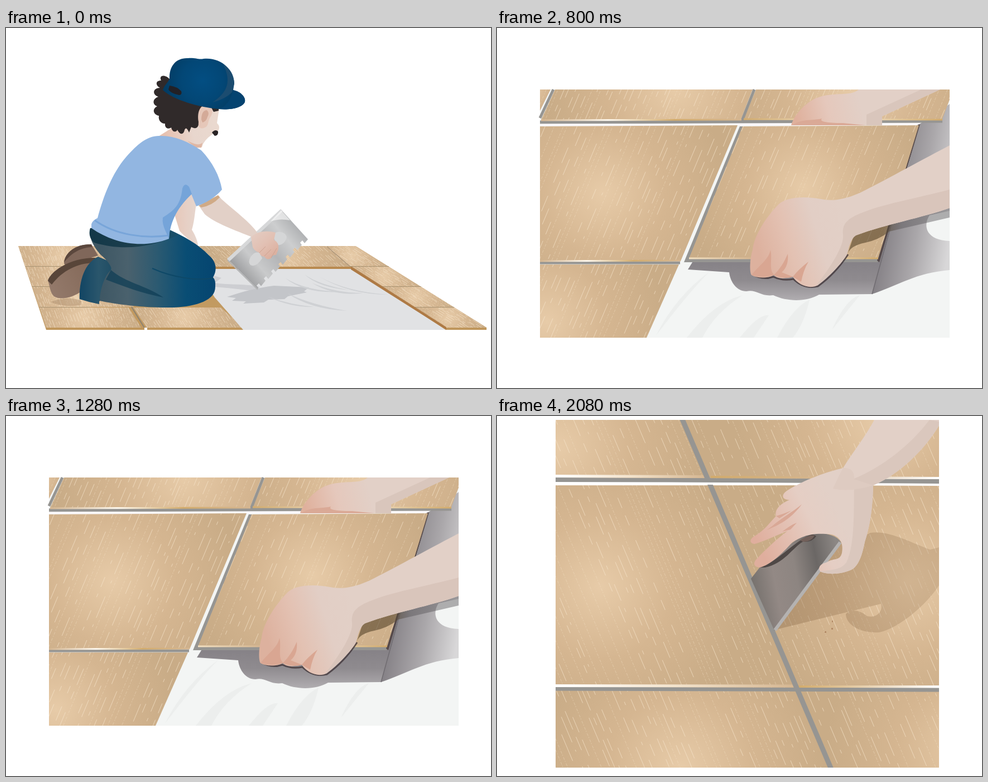
Animation of 869 by 644 pixels, one loop 2400 ms. Source, as an HTML page with a canvas:

```html
<!DOCTYPE html>
<html lang="en">
<head>
<meta charset="utf-8">
<title>Laying floor tiles</title>
<style>
html, body { margin: 0; width: 100%; height: 100%; overflow: hidden; background: #fff; }
canvas { display: block; }
</style>
</head>
<body>
<canvas id="stage" width="869" height="644"></canvas>
<script>
const ctx = document.getElementById('stage').getContext('2d');
const SKIN = '#e2d0c7', GROUT = '#969592', LIGHT = '#e7cba8', TAN = '#d5b691', DARK = '#c9ac87', GOLD = '#d2ab6c';

function fill(d, paint) {
  ctx.fillStyle = paint;
  ctx.fill(new Path2D(d));
}
function line(d, paint, width = 1) {
  ctx.strokeStyle = paint;
  ctx.lineWidth = width;
  ctx.stroke(new Path2D(d));
}
function stops(gradient, colors) {
  colors.forEach((c, i) => gradient.addColorStop(i / (colors.length - 1), c));
  return gradient;
}
const linear = (x0, y0, x1, y1, ...colors) => stops(ctx.createLinearGradient(x0, y0, x1, y1), colors);
const radial = (x, y, r, ...colors) => stops(ctx.createRadialGradient(x, y, 0, x, y, r), colors);

function clipped(d, draw) {
  ctx.save();
  ctx.clip(new Path2D(d));
  draw();
  ctx.restore();
}

function randomFrom(seed) {
  return () => (seed = (seed * 16807) % 2147483647) / 2147483647;
}

// A tile lit from (cx, cy), with pale broken streaks running along `slant` (dx per dy).
function tile(d, [x0, y0, x1, y1], cx, cy, r, slant, gap, dash) {
  fill(d, radial(cx, cy, r, LIGHT, TAN, DARK));
  clipped(d, () => {
    const rnd = randomFrom(x0 * 31 + y0 * 7 + 11), lean = slant * (y1 - y0);
    for (let x = x0 - Math.max(lean, 0); x < x1 - Math.min(lean, 0); x += gap * (0.5 + rnd())) {
      const fine = rnd() < 0.35;
      ctx.setLineDash(fine ? [2, 3, 5, 2] : [dash * (0.5 + rnd()), dash * 0.4, dash * rnd() + 3, dash * 0.8]);
      ctx.lineDashOffset = rnd() * 80;
      line(`M${x},${y0}L${x + lean},${y1}`, fine ? 'rgba(246,228,200,.4)' : 'rgba(247,230,206,.65)', 1);
    }
    ctx.setLineDash([]);
  });
}

function ledge(x0, y0, x1, y1, width, ...colors) {
  line(`M${x0},${y0}L${x1},${y1}`, linear(x0, 0, x1, 0, ...colors), width);
}

function floor() {
  const rows = [[390, 426], [427, 462], [463, 499], [500, 536]];
  fill('M22,390L628,391L861,536V540H72Z', '#c29a61');
  rows.forEach(([a, b], i) => {
    const l = y => 22 + (y - 390) * 0.342, r = y => 628 + (y - 391) * 1.607;
    tile(`M${l(a)},${a}H${l(a) + 160}L${l(b) + 170},${b}H${l(b)}Z`, [22, a, 260, b], l(a) + 80, a + 18, 105, 0.38, 4, 14);
    const inner = y => 617 + (y - 427) * 1.57;
    tile(`M${inner(a)},${a}H${r(a)}L${r(b)},${b}H${inner(b)}Z`, [540, a, 861, b], inner(a) + 60, a + 18, 70, 1.6, 5, 14);
    if (i) line(`M${l(a)},${a - 0.5}H150M${inner(a)},${a - 0.5}H${r(a)}`, '#a99372', 1);
  });
  tile('M180,390H574L617,427H200Z', [180, 390, 617, 427], 490, 408, 120, 1.1, 5, 14);
  tile('M228,500H385L425,536H252Z', [228, 500, 425, 536], 320, 516, 100, 0.65, 4, 14);
  line('M575,391L617,427', '#ad967a', 1.5);
  line('M225,499L249,538', '#8e8371', 2);
  fill('M248,536H253V541H248Z', '#fff');
  fill('M72,536H248V540H72ZM253,536H425V540H253ZM789,536H861V540H789Z', '#bf965c');
  fill('M340,430H620L788,540H425L374,482Z', '#e1e2e4');
  line('M340,429H621', '#b98a50', 4);
  fill('M618,427L624,430L789,535V540L618,432Z', '#ae7a45');
}

function brushMarks() {
  fill('M372,443L386,447L374,456C400,460 430,457 455,463L445,471C420,467 395,465 374,463Z', '#cdced2');
  fill('M396,481C425,471 450,465 480,461L543,464L534,471L539,473L505,480L499,485L470,486L462,491L425,493L430,489L405,488L412,483Z', '#c3c5c9');
  const marks = ['M535,441Q560,459 615,469Q560,464 535,441', 'M560,444Q610,472 685,477Q615,477 560,444',
    'M500,447Q535,470 602,472Q535,476 500,447', 'M505,475Q550,496 611,506Q545,503 505,475', 'M470,481Q510,495 552,499Q510,500 470,481', 'M548,456Q590,474 640,474Q590,481 548,456'];
  marks.forEach(d => fill(d, '#cfd1d4'));
}

function legs() {
  fill('M80,490Q110,478 135,488L134,496Q100,500 80,490', 'rgba(120,90,60,.25)');
  fill('M104,420C106,401 126,386 153,387L165,407L112,424Q104,425 104,420Z', '#80675a');
  fill('M104,419C106,401 126,386 153,387L154,392C130,393 116,405 104,419Z', '#5b473d');
  fill('M75,452C95,426 128,411 160,411L172,430L134,472C118,483 97,487 86,480C78,472 79,462 75,452Z', linear(80, 470, 160, 430, '#947a6b', '#836858'));
  fill('M75,452C79,437 112,411 160,411L157,420C128,421 102,433 82,459Z', '#584539');
  fill('M132,489C130,450 142,420 165,409L215,430L195,470L167,489V494Q150,491 132,485Z', linear(132, 0, 200, 0, '#124563', '#2a566c', '#1c4a61'));
  fill('M151,358C147,374 158,393 170,406C182,416 191,428 188,433C177,442 168,468 168,488C202,495 250,501 300,500C343,498 375,487 375,463Q376,451 371,446C380,431 375,417 365,408C344,386 318,372 293,361Z',
    linear(165, 0, 376, 0, '#3d5663', '#4a616d', '#2c5a71', '#094d74', '#054570'));
  fill('M151,358C147,370 152,379 158,384C205,398 255,395 310,370L293,361Z', linear(150, 0, 310, 0, '#123748', '#1d3f4d', '#18506c'));
  fill('M188,433C215,456 250,460 282,482C245,475 210,462 179,450Z', 'rgba(14,60,84,.7)');
  line('M371,447C345,453 300,447 262,430', '#0e4867', 2);
}

function head() {
  fill('M273,194L300,177L330,180L345,140L382,144L378,170Q385,177 380,184L370,190Q354,201 351,213H335C317,205 300,194 273,194Z', linear(285, 190, 380, 165, '#e7c1b0', '#e8d6cd', '#ead9cf'));
  fill('M352,205C345,212 335,206 325,202L340,214H350Z', '#dfb7a4');
  fill('M369,187Q375,180 380,185Q381,192 374,193Z', '#282325');
  fill('M294,92C285,82 273,84 278,94C266,94 269,104 276,107C261,108 263,120 273,123C261,127 263,138 271,140C261,145 264,155 274,157C272,166 280,172 285,171C284,181 293,181 296,178C298,187 305,187 307,182C311,191 318,192 320,182Q323,175 328,187L332,177C340,182 346,178 345,168L347,149L368,143L372,150L381,148V138L310,106Z', '#302a2a');
  fill('M345,168C342,150 348,138 359,137C369,138 373,148 367,158C360,167 365,176 354,179C347,181 344,176 345,168Z', '#e6c7b9');
  fill('M350,164C350,154 353,147 360,147Q365,152 361,159Q359,167 352,169Z', '#d4aa98');
  fill('M293,91C292,68 305,53 326,54C340,53 345,57 354,55C386,52 408,75 409,99L407,111C421,114 430,124 428,132C424,143 401,147 382,145C347,142 300,129 281,111C283,103 290,98 293,91Z', radial(352, 94, 75, '#034e82', '#034776', '#03395e'));
  fill('M389,65Q408,76 409,99L405,115Q393,127 370,133C398,115 404,94 389,65Z', '#1b4c70');
  fill('M407,111C421,114 430,124 428,132C424,143 401,147 382,145C398,138 403,125 407,111Z', '#044370');
  fill('M293,103Q307,105 314,113Q316,120 310,120Q295,117 291,110Z', '#222126');
}

function trowel() {
  let edge = 'M397,413L493,325L541,378';
  for (let i = 0; i < 7; i++) {
    const x = 541 - i * 13, y = 378 + i * 12.8;
    edge += `L${x - 6},${y + 7}l-4,-5l-4,4l3,4`;
  }
  fill(edge + 'L451,467Z', linear(420, 440, 525, 350, '#9c9d9f', '#c9cacb', '#b4b5b7', '#cdcecf', '#aaacae'));
  fill('M396,413L492,324L496,328L400,418Z', '#d7d8d9');
  line('M397,415L451,468', '#b4b5b6', 2);
  fill('M493,326L509,344Q490,340 474,346Z', 'rgba(255,255,255,.6)');
  fill('M477,370C486,361 501,364 503,374C501,384 494,389 486,388ZM438,410Q446,398 455,403L459,412Q448,429 438,424Q433,419 438,410Z', '#d5d6d7');
}

function worker() {
  floor();
  brushMarks();
  fill('M333,297C316,310 307,325 302,334L311,363C322,375 338,386 345,393C343,378 337,367 333,361C339,341 338,325 342,313Z', linear(302, 0, 342, 0, '#e7c8ba', '#e6d6ce'));
  legs();
  head();
  trowel();
  fill('M347,320L381,300L386,306C413,330 436,346 451,367L441,374C411,362 374,349 356,333Z', SKIN);
  fill('M345,318L380,299L383,303Q369,318 350,321Z', '#d0aa86');
  fill('M439,374C451,363 468,362 483,366L480,379Q490,384 488,396L484,406Q476,405 475,412Q467,416 463,409Q456,409 454,402Q445,399 442,392Z', linear(440, 365, 478, 411, '#e4cdc3', '#e2c1b4', '#dcaf9e'));
  line('M463,408L475,396M454,402L465,391M475,411L485,394', '#cda392', 1);
  fill('M153,351Q155,344 164,340C175,300 190,260 215,231C236,207 254,192 276,193C301,192 326,203 350,219C370,240 383,265 387,289Q370,309 341,319L332,297C311,319 295,340 293,362L292,377C245,395 193,386 153,358Z', '#92b6e1');
  fill('M281,339C302,326 313,316 316,287Q320,275 328,284L333,297C310,318 294,344 292,377L287,366Q279,350 281,339Z', '#75a4d9');
  line('M159,344C197,371 248,377 292,371', '#78a5d9', 3);
}

function laying() {
  const mid = [77, 174, 435, 420];
  fill('M77,110H811V554H77Z', '#f3f5f4');
  ['M285,550Q320,480 382,435Q350,465 285,550', 'M340,554Q390,490 440,478Q390,510 368,554', 'M435,554Q470,510 487,514L460,554', 'M502,554Q530,500 560,486Q550,530 530,554', 'M600,540Q625,485 650,478L600,540']
    .forEach(d => fill(d, '#eceeed'));
  // Shadows on the bare floor
  fill('M811,136L757,172L672,476C720,460 750,438 811,433Z', linear(705, 280, 825, 300, '#858186', '#aaa7aa', '#d8d7d8'));
  fill('M811,327L775,335C762,355 770,380 811,381Z', '#f3f5f4');
  fill('M352,416L342,432L416,437C418,455 430,471 447,471C465,467 472,481 495,478C520,490 555,490 577,477L672,476L712,330Z', linear(0, 415, 0, 488, '#858186', '#8f8b8f', '#b1aeb1'));
  line('M672,476L708,346', '#6f6b70', 1.5);

  tile('M77,110H96L77,148Z', [77, 110, 96, 148], 60, 110, 60, -0.42, 9, 18);
  line('M101,110L77,161', GROUT, 5);
  tile('M104,110H458L437,164H79Z', [77, 110, 458, 164], 320, 110, 230, -0.42, 11, 26);
  tile('M464,110H811V128L797,165H441Z', [441, 110, 811, 165], 640, 110, 230, -0.42, 11, 26);
  line('M461,110L438,168', GROUT, 5);
  line('M77,168.5L798,166.5', GROUT, 6);
  ledge(79, 165, 438, 164, 3, TAN, '#fffaf0', GOLD, TAN);
  ledge(442, 163, 798, 164, 3, GOLD, '#f4e6d0', GOLD);
  line('M77,173.5L757,172', '#faf8fa', 4);

  tile('M77,176L431,174L329,417H77Z', mid, 190, 295, 225, -0.42, 13, 32);
  line('M77,420H328', GROUT, 5);
  ledge(77, 417, 329, 416, 3, TAN, '#fffaf0', GOLD, TAN);
  tile('M77,423H326L268,554H77Z', [77, 423, 326, 554], 90, 525, 210, -0.42, 12, 32);

  fill('M435,176H441L346,411H684L682,419H335Z', GROUT);
  fill('M754,173L758,172L685,419L681,416Z', '#55494a');
  tile('M440,176L756,174L683,412H344Z', [343, 173, 757, 415], 550, 285, 210, -0.42, 13, 32);
  ledge(344, 412, 683, 412, 3, '#f2dfc0', TAN, '#efdcbc', GOLD);

  fill('M527,174C533,154 556,130 576,124C604,114 634,123 648,110H794L690,158V174Z', linear(535, 160, 650, 130, '#dfb09c', '#e5c8bc', SKIN));
  fill('M662,155L760,110H794L690,158V174H662Z', '#d9c6bc');
  fill('M529,174C545,162 564,166 582,162Q574,170 620,170L660,174Z', '#daa996');

  fill('M627,408C630,394 641,388 660,384Q684,379 703,364L811,339V320L640,369Z', linear(690, 0, 725, 0, 'rgba(86,68,42,.6)', 'rgba(88,85,88,.45)'));
  line('M457,440Q475,452 495,445Q512,453 531,449Q550,468 575,462Q606,440 629,405', 'rgba(67,55,59,.8)', 3);
  fill('M811,210C770,231 700,270 650,295C620,308 602,309 586,307C550,300 520,302 505,315C480,340 460,374 458,397C453,412 452,436 456,442C470,450 490,446 496,442C505,451 520,447 530,445C540,460 560,468 575,460C595,445 619,420 627,405C631,390 633,378 643,371C700,350 760,340 811,322Z',
    linear(465, 390, 625, 340, '#ddb19e', '#e3c1b2', '#e2cec5', SKIN));
  fill('M811,289C750,305 690,315 650,332C626,342 618,352 620,370C622,390 600,424 572,461C595,445 619,420 627,405C631,390 633,378 643,371C700,350 760,340 811,322Z', '#d9c5bb');
  fill('M456,442C470,424 487,414 490,397C494,415 486,432 497,442Q475,448 456,442ZM496,442C507,431 514,420 521,404Q523,426 510,437L530,445Q515,450 496,442ZM530,445Q540,432 558,418Q549,433 545,454Z', '#d9a692');
}

function scraping() {
  clipped('M105,7H792V629H105Z', () => {
    const joint = y => 332.5 + (y - 7) * 0.4265;
    [[7, 112, 110, 55, 690, 7], [124, 486, 185, 305, 735, 295], [490, 629, 330, 629, 850, 600]].forEach(([a, b, lx, ly, rx, ry]) => {
      tile(`M105,${a}H${joint(a)}L${joint(b)},${b}H105Z`, [105, a, joint(b), b], lx, ly, 260, 0.424, 13, 36);
      tile(`M${joint(a)},${a}H792V${b}H${joint(b)}Z`, [joint(a), a, 792, b], rx, ry, 260, 0.424, 13, 36);
    });
    line('M105,114L792,117', GROUT, 8);
    line('M105,488L792,490', GROUT, 7);
    ledge(105, 107.5, 373, 108.5, 5, '#fff', '#f3e3cc', TAN);
    ledge(383, 109, 792, 111, 4, GOLD, TAN, '#fff');
    ledge(105, 482.5, 533, 483, 5, '#fff', '#f3e3cc', TAN);
    ledge(540, 484, 792, 484, 4, GOLD, '#e8d2b2', '#fff');
    line(`M${joint(0)},0L${joint(636)},636`, GROUT, 9);
    line('M105,120.5H310L792,123', '#fff', 4);

    fill('M500,382L688,336C692,350 680,362 663,358C650,347 635,345 625,354C625,374 652,389 685,387C720,380 770,337 792,303V235L776,239C740,226 702,204 669,209C655,216 635,228 616,225Z', linear(520, 0, 792, 0, 'rgba(148,116,82,.44)', 'rgba(148,116,82,.32)', 'rgba(148,116,82,.24)'));
    fill('M587,385h3v3h-3zM599,379h3v3h-3zM600,366h2v3h-2z', '#b38b67');

    fill('M455,291L473,268L545,215C570,205 605,209 616,225L497,384Z', linear(458, 300, 615, 270, '#77726e', '#938985', '#8d8581', '#6b6765', '#8c8784'));
    fill('M469,271C500,264 530,225 565,211L572,215Q565,226 548,225C530,235 515,264 480,271Z', '#4f4846');
    fill('M543,222Q562,211 569,214Q562,226 548,225Z', '#72605a');
    line('M498,383L615,226', '#b4b2b1', 6);

    fill('M676,7H792V17C765,62 720,105 674,124C673,170 667,201 659,225C654,251 647,269 635,275C615,284 590,284 579,278C574,270 581,264 590,262C605,253 614,260 618,245C622,224 611,211 590,211C559,209 544,217 529,226C509,248 490,266 471,271C459,270 458,262 467,254C480,240 499,222 520,206C499,214 479,224 461,229C451,227 453,219 463,214C480,204 489,190 500,179C497,169 505,158 524,150C509,150 510,140 519,134C550,114 591,100 620,93C640,61 660,37 676,7Z',
      linear(465, 225, 605, 155, '#dfae9d', '#e3beb0', '#e5cec4', SKIN));
    fill('M792,10V17C765,62 720,105 674,124C673,170 667,201 659,225C654,251 647,269 635,275C615,284 590,284 579,278C595,275 615,277 626,262C642,230 639,165 640,112C690,91 738,55 775,7Z', '#dac7bd');
    fill('M602,130Q611,110 620,93Q641,92 640,113L674,124Q632,137 602,130Z', '#decbc1');
    fill('M493,197C510,182 531,171 546,158C529,181 511,193 483,204ZM511,207Q526,195 537,191L526,203ZM500,179Q514,175 528,169L506,183Z', '#d9a896');
  });
}

const scenes = [worker, laying, scraping];
let shown = -1;
function tick() {
  const current = Math.floor(performance.now() / 800) % scenes.length;
  if (current !== shown) {
    shown = current;
    ctx.fillStyle = '#fff';
    ctx.fillRect(0, 0, 869, 644);
    scenes[current]();
  }
  requestAnimationFrame(tick);
}
tick();
</script>
</body>
</html>
```
